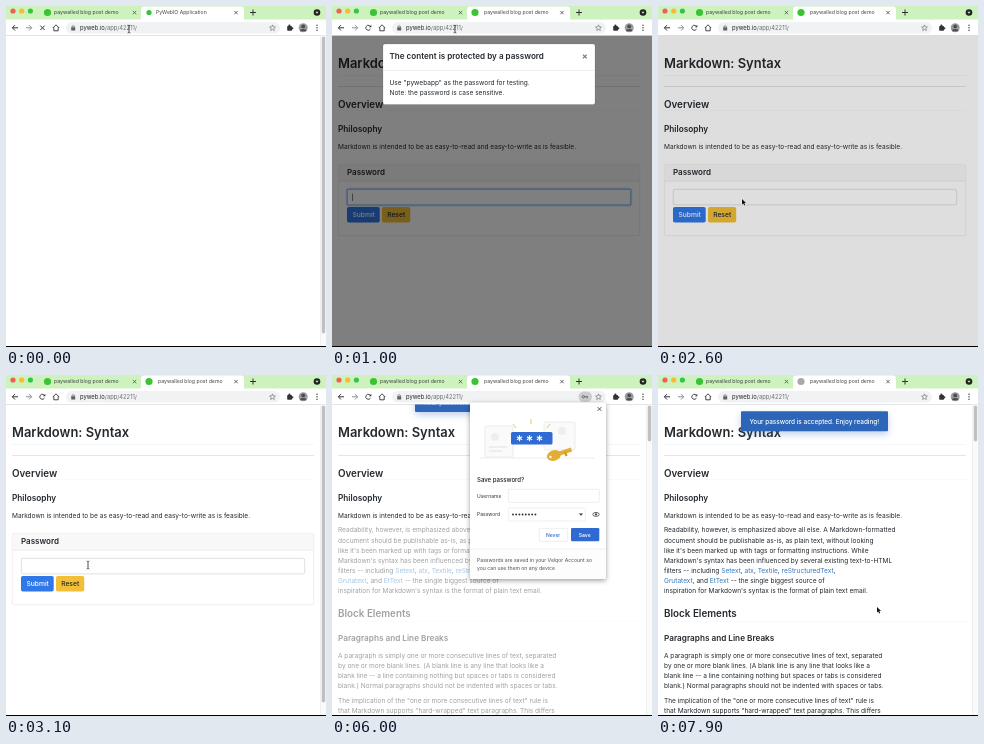
An HTML page with a canvas for the animation above (8000 ms loop, 320 by 341 pixels).

```html
<!DOCTYPE html>
<html lang="en">
<head>
<meta charset="utf-8">
<title>Paywalled post demo</title>
<style>
html, body { margin: 0; width: 100%; height: 100%; overflow: hidden; background: #fff; }
canvas { display: block; width: 320px; height: 341px; }
</style>
</head>
<body>
<canvas id="stage"></canvas>
<script>
const W = 320, H = 341, LOOP = 8000;
const canvas = document.getElementById('stage');
const c = canvas.getContext('2d');
const dpr = window.devicePixelRatio || 1;
canvas.width = W * dpr;
canvas.height = H * dpr;

const FONT = 'Inter, "Open Sans", sans-serif';
const INK = '#24292e', GREEN = '#3bc336', STRIP = '#cdf2be';
const T = { load: 100, dismiss: 2310, focus: 3100, type: 3900, submit: 5850, never: 7250 };
const KEYS = [3900, 4100, 4200, 4300, 4600, 5000, 5200, 5300];

const span = (t, a, b) => Math.min(1, Math.max(0, (t - a) / (b - a)));
const mix = (a, b, p) => a + (b - a) * p;
const easeOut = p => 1 - (1 - p) ** 3;
const swing = p => 0.5 - Math.cos(p * Math.PI) / 2;

function rect(x, y, w, h, fill) {
  c.fillStyle = fill;
  c.fillRect(x, y, w, h);
}

function box(x, y, w, h, r, fill, line, lw = 0.6) {
  c.beginPath();
  c.roundRect(x, y, w, h, r);
  if (fill) { c.fillStyle = fill; c.fill(); }
  if (line) { c.strokeStyle = line; c.lineWidth = lw; c.stroke(); }
}

function disc(x, y, r, fill) {
  c.beginPath();
  c.arc(x, y, r, 0, 7);
  c.fillStyle = fill;
  c.fill();
}

function ring(x, y, r, color, lw = 0.8, from = 0, to = 7) {
  c.beginPath();
  c.arc(x, y, r, from, to);
  c.strokeStyle = color;
  c.lineWidth = lw;
  c.stroke();
}

// points: x, y, x, y, ...
function path(points, color, lw, fill) {
  c.beginPath();
  for (let i = 0; i < points.length; i += 2) c.lineTo(points[i], points[i + 1]);
  if (fill) { c.closePath(); c.fillStyle = fill; c.fill(); }
  if (color) { c.strokeStyle = color; c.lineWidth = lw; c.stroke(); }
}

function cross(x, y, r, color, lw = 0.9) {
  path([x - r, y - r, x + r, y + r], color, lw);
  path([x - r, y + r, x + r, y - r], color, lw);
}

// y is the middle of the capitals; [brackets] mark links
function text(s, x, y, size = 6.55, color = INK, weight = 400) {
  c.font = `${weight} ${size}px ${FONT}`;
  s.split(/[\[\]]/).forEach((part, i) => {
    c.fillStyle = i % 2 ? '#3478bd' : color;
    c.fillText(part, x, y + size * 0.36);
    x += c.measureText(part).width;
  });
  return x;
}

const heading = (s, x, y, size) => text(s, x, y, size, INK, 600);

function shadow(color, blur, dy, draw) {
  c.save();
  c.shadowColor = color;
  c.shadowBlur = blur * dpr;
  c.shadowOffsetY = dy * dpr;
  draw();
  c.restore();
}

function faded(alpha, draw) {
  if (alpha <= 0) return;
  c.save();
  c.globalAlpha = alpha;
  draw();
  c.restore();
}

function drawTabs(t) {
  rect(0, 0, W, 14, STRIP);
  ['#f25f57', '#f5bd2f', '#35c648'].forEach((col, i) => disc(7 + i * 8.7, 5, 2.6, col));
  disc(41.5, 6.5, 3.6, GREEN);
  text('paywalled blog post demo', 48, 6.6, 5.2, '#3a4438');
  cross(128.5, 6.6, 1.7, '#4a5547', 0.8);
  box(135, 0.5, 103, 18, 3, '#fff');
  const loading = t < T.load;
  disc(143, 6.5, loading ? 2.6 : 3.6, t > 6350 ? '#a9a9a9' : GREEN);
  if (loading) text('PyWebIO Application', 150, 6.6, 5.1, '#444');
  else text('paywalled blog post demo', 152, 6.6, 5.2, '#444');
  cross(230, 6.6, 1.7, '#444', 0.8);
  path([244, 6.5, 250, 6.5], '#333', 1);
  path([247, 3.5, 247, 9.5], '#333', 1);
  disc(311, 6.5, 3.3, '#222');
  path([309.4, 5.7, 312.6, 5.7, 311, 7.8], null, 0, STRIP);
}

function drawToolbar(t) {
  const dark = '#333', mid = '#5f6368';
  rect(0, 13.5, W, 16, '#fff');
  path([12, 21.8, 6.5, 21.8], dark, 1);
  path([9, 19.1, 6.3, 21.8, 9, 24.5], dark, 1);
  path([20, 21.8, 25.5, 21.8], '#8b8f93', 1);
  path([23, 19.1, 25.7, 21.8, 23, 24.5], '#8b8f93', 1);
  if (t < T.load) {
    cross(36.5, 21.8, 2.2, dark, 1);
  } else {
    ring(36.3, 21.8, 2.5, dark, 0.9, 0.5, 5.5);
    path([39.3, 18.8, 39.3, 21.3, 36.8, 21.3], null, 0, dark);
  }
  path([46.8, 22, 50, 18.8, 53.2, 22], dark, 0.9);
  path([47.8, 21.4, 47.8, 24.8, 52.2, 24.8, 52.2, 21.4], dark, 0.9);

  box(60, 16, 214, 11.6, 5.8, '#f0f2f3');
  rect(65.2, 21.2, 4, 3.3, mid);
  ring(67.2, 21, 1.3, mid, 0.7, Math.PI, 2 * Math.PI);
  const x = text('pyweb.io', 74, 21.8, 5.8, '#26282a');
  text('/app/42211/', x, 21.8, 5.8, '#6b6f73');

  if (t >= T.type && t < T.never) {
    if (t >= T.submit) box(246.5, 16.6, 13.5, 10.4, 5.2, '#cbcdd0');
    ring(251.3, 21.8, 1.2, mid, 0.9);
    path([252.5, 21.8, 256, 21.8], mid, 1);
    path([255.2, 21.8, 255.2, 23.4], mid, 0.8);
  }

  const star = [];
  for (let i = 0; i <= 10; i++) {
    const a = i * Math.PI / 5 - Math.PI / 2, r = i % 2 ? 1.4 : 3.1;
    star.push(266.5 + r * Math.cos(a), 22 + r * Math.sin(a));
  }
  path(star, mid, 0.6);

  box(281.2, 20, 4.8, 4.8, 0.7, dark);
  disc(283.4, 19.6, 1.1, dark);
  disc(286.3, 22.3, 1.1, dark);

  disc(297.2, 21.8, 4.5, '#9b9c9f');
  disc(297.2, 20.4, 1.9, '#4c4d51');
  c.beginPath();
  c.ellipse(297.2, 25.2, 3.2, 2.2, 0, Math.PI, 0);
  c.fillStyle = '#4c4d51';
  c.fill();
  [-2.5, 0, 2.5].forEach(d => disc(311, 21.8 + d, 0.7, dark));
  rect(0, 29, W, 0.7, '#d9dbdc');
}

function drawScrollbar(thumb) {
  rect(314, 29.7, 6, 311, '#fafafa');
  rect(314, 29.7, 0.5, 311, '#e6e6e6');
  box(315.8, 30.5, 3.4, thumb, 1.7, '#c0c0c0');
}

function drawHeadings() {
  heading('Markdown: Syntax', 6, 57.5, 12.95);
  rect(6, 69, 302, 0.6, '#eef0f2');
  rect(6, 80, 302, 1, '#e3e5e8');
  heading('Overview', 6, 98, 9.8);
  rect(6, 104.5, 302, 0.5, '#f1f2f4');
  heading('Philosophy', 6, 123.3, 8.25);
  text('Markdown is intended to be as easy-to-read and easy-to-write as is feasible.', 6, 140.5);
}

function paragraph(y, lines) {
  lines.forEach((s, i) => text(s, 6, y + i * 10.15));
}

function drawArticle() {
  paragraph(155, [
    'Readability, however, is emphasized above all else. A Markdown-formatted',
    'document should be publishable as-is, as plain text, without looking',
    "like it's been marked up with tags or formatting instructions. While",
    "Markdown's syntax has been influenced by several existing text-to-HTML",
    'filters -- including [Setext], [atx], [Textile], [reStructuredText],',
    '[Grutatext], and [EtText] -- the single biggest source of',
    "inspiration for Markdown's syntax is the format of plain text email."
  ]);
  heading('Block Elements', 6, 238, 9.85);
  rect(6, 246, 302, 0.5, '#f1f2f4');
  heading('Paragraphs and Line Breaks', 6, 263.5, 8.2);
  paragraph(280.3, [
    'A paragraph is simply one or more consecutive lines of text, separated',
    'by one or more blank lines. (A blank line is any line that looks like a',
    'blank line -- a line containing nothing but spaces or tabs is considered',
    'blank.) Normal paragraphs should not be indented with spaces or tabs.'
  ]);
  paragraph(325.8, [
    'The implication of the "one or more consecutive lines of text" rule is',
    'that Markdown supports "hard-wrapped" text paragraphs. This differs'
  ]);
}

function drawForm(t) {
  box(6.3, 158.3, 301.4, 71.4, 1.8, '#fff', '#e2e2e2');
  box(6.6, 158.6, 300.8, 16.4, 1.5, '#f8f8f8');
  rect(6.3, 174.8, 301.4, 0.6, '#dedede');
  heading('Password', 15, 166.3, 8);

  const focus = t < T.focus
    ? 1 - span(t, T.dismiss - 60, T.dismiss + 80)
    : span(t, T.focus, T.focus + 150);
  box(15.3, 183.3, 283.4, 15.6, 1.8, '#fff', '#ced4da', 0.7);
  faded(focus, () => {
    box(14.6, 182.6, 284.8, 17, 2.4, null, '#bfdeff', 1.6);
    box(15.3, 183.3, 283.4, 15.6, 1.8, null, '#80bdff', 0.8);
  });
  const typed = KEYS.filter(k => t >= k);
  typed.forEach((k, i) => disc(22.3 + i * 3.45, 191.2, 1.15, '#444'));
  const since = typed.length ? typed[typed.length - 1] : t < T.focus ? 0 : T.focus;
  if (focus === 1 && t < 5500 && (t - since) % 1000 < 500)
    rect(20.4 + typed.length * 3.45, 187.5, 0.6, 7.5, '#333');

  box(15, 201, 32.7, 15.6, 1.8, '#3077e8');
  text('Submit', 20.5, 209, 6.7, '#fff', 500);
  box(50, 201, 28.2, 15.6, 1.8, '#f2bf36');
  text('Reset', 55.2, 209, 6.7, INK, 500);
}

function drawModal(t) {
  const inP = span(t, 250, 550), outP = span(t, T.dismiss, T.dismiss + 300);
  const alpha = Math.min(span(t, 250, 400), 1 - span(t, T.dismiss, T.dismiss + 135));
  const dy = -22 * (1 - easeOut(inP)) - 20 * outP;
  faded(alpha, () => {
    c.translate(0, dy);
    box(51, 38, 212, 60.5, 2, '#fff', 'rgba(0,0,0,.2)', 0.5);
    heading('The content is protected by a password', 57.5, 50.5, 8.1);
    cross(252.8, 50.5, 1.9, '#777', 1.2);
    rect(51, 64, 212, 0.6, '#e3e5e8');
    text('Use "pywebapp" as the password for testing.', 57.5, 76.8);
    text('Note: the password is case sensitive.', 57.5, 87);
  });
}

function drawToast(t) {
  const p = easeOut(span(t, T.submit, T.submit + 400));
  faded(Math.min(1, p * 1.3), () => {
    c.translate(0, -80 * (1 - p));
    shadow('rgba(45,100,190,.3)', 7, 3, () => box(83, 36.3, 147, 20, 1, '#2d66b9'));
    text('Your password is accepted. Enjoy reading!', 91.4, 46.5, 6.4, '#fff', 500);
  });
}

function drawArtwork() {
  const pale = '#dfe1e5', gold = '#e3ad35';
  box(153, 51, 28, 31, 1.5, '#fafafa', pale);
  box(212, 47, 31, 28, 1.5, '#fafafa', pale);
  disc(163, 62, 4, '#eceef0');
  disc(230, 56, 4, '#eceef0');
  path([157, 72, 175, 72], pale, 1);
  path([157, 76, 170, 76], pale, 1);
  path([148, 83, 262, 83], pale, 0.6);
  path([181, 49, 184, 53], '#f5c842', 1);
  path([199, 44, 199, 49], '#f5c842', 1);
  path([218, 49, 215, 53], '#f5c842', 1);
  box(179, 57, 41.5, 12.5, 1.5, '#2f6bd3');
  [187.5, 197.5, 207.5].forEach(x => {
    for (let i = 0; i < 3; i++) {
      const a = i * Math.PI / 3 + Math.PI / 2, dx = 3 * Math.cos(a), dy = 3 * Math.sin(a);
      path([x - dx, 63.2 - dy, x + dx, 63.2 + dy], '#fff', 1.1);
    }
  });
  c.beginPath();
  c.ellipse(222, 80.5, 7.2, 5.2, -0.3, 0, 7);
  c.fillStyle = gold;
  c.fill();
  disc(218.5, 82, 1.2, '#fff');
  path([226, 79, 239.5, 74.5], gold, 4);
  path([233, 77, 234.5, 81], '#d59c25', 2.4);
}

function drawBubble() {
  shadow('rgba(0,0,0,.4)', 5, 1.5, () => box(138, 27.5, 136, 176.5, 2, '#fff'));
  cross(267.5, 34, 1.9, '#444', 0.9);
  drawArtwork();
  text('Save password?', 145, 105.2, 6.05, '#202124', 500);
  text('Username', 145, 120.8, 5, '#333');
  box(176.3, 114.3, 91, 13, 1.2, '#fff', '#dfe1e3');
  text('Password', 145, 139.5, 5, '#333');
  box(176.3, 133, 77, 13, 1.2, '#fff', '#e4e6e8');
  for (let i = 0; i < 8; i++) disc(181 + i * 3.2, 139.5, 0.95, '#333');
  path([247, 138.6, 251, 138.6, 249, 140.8], null, 0, '#333');
  c.beginPath();
  c.ellipse(264, 139.4, 3.2, 2, 0, 0, 7);
  c.strokeStyle = '#444';
  c.lineWidth = 0.8;
  c.stroke();
  disc(264, 139.4, 1.1, '#444');
  box(207.3, 153.3, 28.4, 13, 1.2, '#fff', '#dfe1e3');
  text('Never', 214, 159.8, 5, '#2b68cf', 500);
  box(239, 153, 28.3, 13.3, 1.2, '#2f69d2');
  text('Save', 246.8, 159.8, 5, '#fff', 600);
  box(138, 174, 136, 30, [0, 0, 2, 2], '#fdfdfd');
  rect(138, 173.7, 136, 0.6, '#e4e6e8');
  text('Passwords are saved in your Velqor Account so', 145, 184.8, 5.12, '#4c5054');
  text('you can use them on any device', 145, 193.6, 5.12, '#4c5054');
}

// start, end, target x, target y
const MOVES = [
  [1150, 2200, 82, 194],
  [2420, 2590, 84, 193],
  [2950, 3100, 82, 190],
  [6550, 7100, 220, 159],
  [7300, 7850, 219, 232]
];

function drawPointer(t) {
  if (t >= T.type && t < 6550) return;
  let x = 123, y = 23;
  for (const [a, b, tx, ty] of MOVES) {
    const p = swing(span(t, a, b));
    x = mix(x, tx, p);
    y = mix(y, ty, p);
  }
  if (y < 28 || (t >= 3050 && t < T.type)) {
    path([x, y - 3.5, x, y + 3.5], '#222', 0.8);
    path([x - 1.4, y - 4, x, y - 3.4, x + 1.4, y - 4], '#222', 0.6);
    path([x - 1.4, y + 4, x, y + 3.4, x + 1.4, y + 4], '#222', 0.6);
    return;
  }
  const arrow = [0, 0, 0, 5.6, 1.3, 4.4, 2.2, 6.4, 3.2, 5.9, 2.3, 4, 4, 4, 0, 0];
  c.save();
  c.translate(x, y);
  path(arrow, '#fff', 0.9);
  path(arrow, null, 0, '#111');
  c.restore();
}

function drawPage(t) {
  c.save();
  c.beginPath();
  c.rect(0, 29.5, W, H);
  c.clip();
  const done = t >= T.submit;
  const shade = 0.5 * Math.min(span(t, 150, 300), 1 - span(t, 2490, 2640));
  if (t >= T.load) {
    drawHeadings();
    if (done) faded(swing(span(t, 5830, 6200)), drawArticle);
    else drawForm(t);
  }
  if (shade === 0) drawScrollbar(done ? 36 : 297);
  else rect(0, 29.5, W, H, `rgba(0,0,0,${shade})`);
  drawModal(t);
  if (done) drawToast(t);
  c.restore();
}

function draw(t) {
  c.setTransform(dpr, 0, 0, dpr, 0, 0);
  rect(0, 0, W, H, '#fff');
  drawTabs(t);
  drawToolbar(t);
  drawPage(t);
  if (t >= T.submit && t < T.never) drawBubble();
  drawPointer(t);
  rect(0, 340, W, 1, '#000');
}

function tick() {
  draw(performance.now() % LOOP);
  requestAnimationFrame(tick);
}
tick();
</script>
</body>
</html>
```
